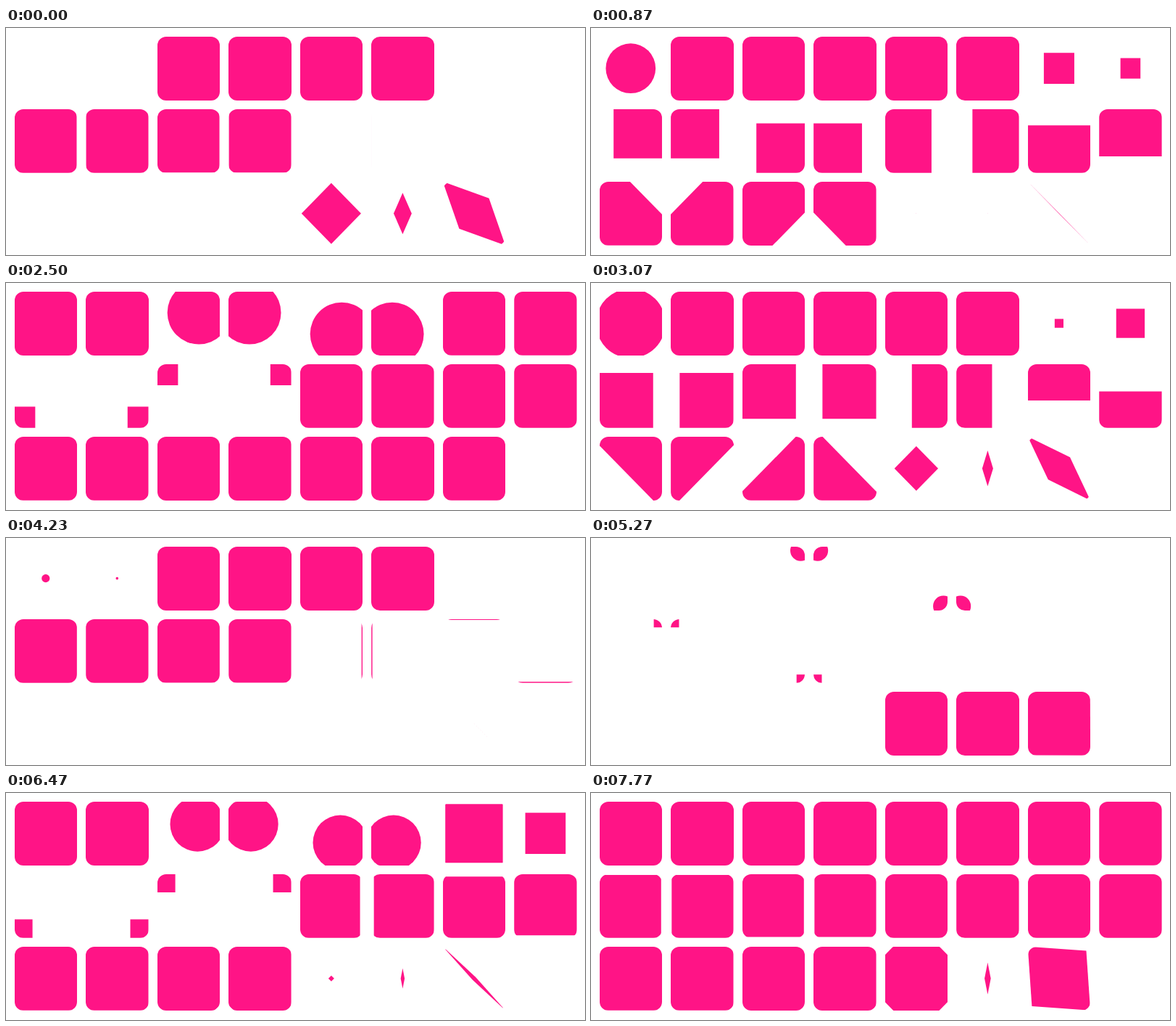
Recreate the animation shown at these times as an HTML page. Size 799 by 313 pixels, loop 7.81 s.

```html
<!DOCTYPE html>
<html lang="en">
<head>
<meta charset="utf-8">
<title>Clip-path transitions</title>
<style>
  html, body { margin: 0; width: 100%; height: 100%; overflow: hidden; background: #fff; }
  .tile {
    position: absolute;
    width: 86.4px;
    height: 88.1px;
    border-radius: 12px;
    background: #ff1486;
  }
</style>
</head>
<body>
<script>
const LOOP = 7810;
const EASE = 'cubic-bezier(.25, 1, .3, 1)';

// start: when the reveal begins; show / hide: lengths of both halves
const SLOW = { start: 284, show: 2500, hide: 2500 };
const CORNER = { start: 2284, show: 2500, hide: 1500 };
const QUICK = { start: 1284, show: 1500, hide: 1500 };

const circle = (r, x = 50, y = 50) => `circle(${r}% at ${x}% ${y}%)`;
const inset = (...sides) => `inset(${sides.map(s => s + '%').join(' ')})`;
const polygon = points => `polygon(${points.map(([x, y]) => `${x}% ${y}%`).join(', ')})`;
const diamond = (w, h = w) => polygon([[50 - w, 50], [50, 50 - h], [50 + w, 50], [50, 50 + h]]);
const corners = d => polygon([[0, 0], [50 + d, 50 - d], [100, 100], [50 - d, 50 + d]]);

// a triangle that grows out of the corner x, y
const triangle = (x, y, size) => polygon([
  [x, y],
  [x ? x - size : size, y],
  [x, y ? y - size : size]
]);

// a box collapsed into the corner x, y
const cornerBox = (x, y) => inset(y, 100 - x, 100 - y, x);

const FULL = inset(0, 0, 0, 0);
const tile = (time, show, hide) => ({ time, show, hide });
const mirror = (time, ...steps) => tile(time, steps, [...steps].reverse());

const circleTo = (x, y) => tile(CORNER,
  [circle(0), circle(150, x, y)], [circle(125), circle(0, x, y)]);
const boxFrom = (x, y) => tile(CORNER,
  [cornerBox(x, y), FULL], [FULL, cornerBox(100 - x, 100 - y)]);
const wipe = (from, to) => tile(SLOW, [inset(...from), FULL], [FULL, inset(...to)]);
const diagonal = (x, y) => tile(SLOW,
  [triangle(x, y, 0), triangle(x, y, 200)],
  [triangle(100 - x, 100 - y, 200), triangle(100 - x, 100 - y, 0)]);

const TOP = [0, 0, 100, 0], RIGHT = [0, 0, 0, 100];
const BOTTOM = [100, 0, 0, 0], LEFT = [0, 100, 0, 0];

const rows = [
  [
    mirror(SLOW, circle(0), circle(40), circle(125)),
    mirror(SLOW, circle(0), circle(125)),
    circleTo(100, 0), circleTo(0, 0), circleTo(100, 100), circleTo(0, 100),
    mirror(SLOW, inset(100, 100, 100, 100), FULL),
    mirror(SLOW, inset(100, 100, 100, 100), inset(33, 33, 33, 33), FULL)
  ],
  [
    boxFrom(0, 100), boxFrom(100, 100), boxFrom(0, 0), boxFrom(100, 0),
    wipe(LEFT, RIGHT), wipe(RIGHT, LEFT), wipe(BOTTOM, TOP), wipe(TOP, BOTTOM)
  ],
  [
    diagonal(0, 100), diagonal(100, 100), diagonal(0, 0), diagonal(100, 0),
    mirror(QUICK, diamond(0), diamond(100)),
    mirror(QUICK, diamond(0), diamond(5, 25), diamond(100)),
    mirror(QUICK, corners(0), corners(50))
  ]
];

// three-step halves hesitate at 40 %
function half(steps, from, length) {
  const marks = steps.length === 3 ? [0, 0.4, 1] : [0, 1];
  return steps.map((clipPath, i) => ({
    clipPath, offset: Math.min(1, from + marks[i] * length), easing: EASE
  }));
}

const tracks = rows.flatMap((row, r) => row.map(({ time, show, hide }, c) => {
  const el = document.createElement('div');
  el.className = 'tile';
  el.style.left = 11.6 + c * 98.52 + 'px';
  el.style.top = 11.6 + r * 100.05 + 'px';
  document.body.append(el);

  const period = time.show + time.hide;
  const split = time.show / period;
  const frames = [...half(show, 0, split), ...half(hide, split, 1 - split)];
  const anim = el.animate(frames, { duration: period, iterations: Infinity });
  anim.pause();
  return { anim, shift: period - time.start };
}));

function draw() {
  const t = performance.now() % LOOP;
  for (const { anim, shift } of tracks) anim.currentTime = t + shift;
  requestAnimationFrame(draw);
}
draw();
</script>
</body>
</html>
```
